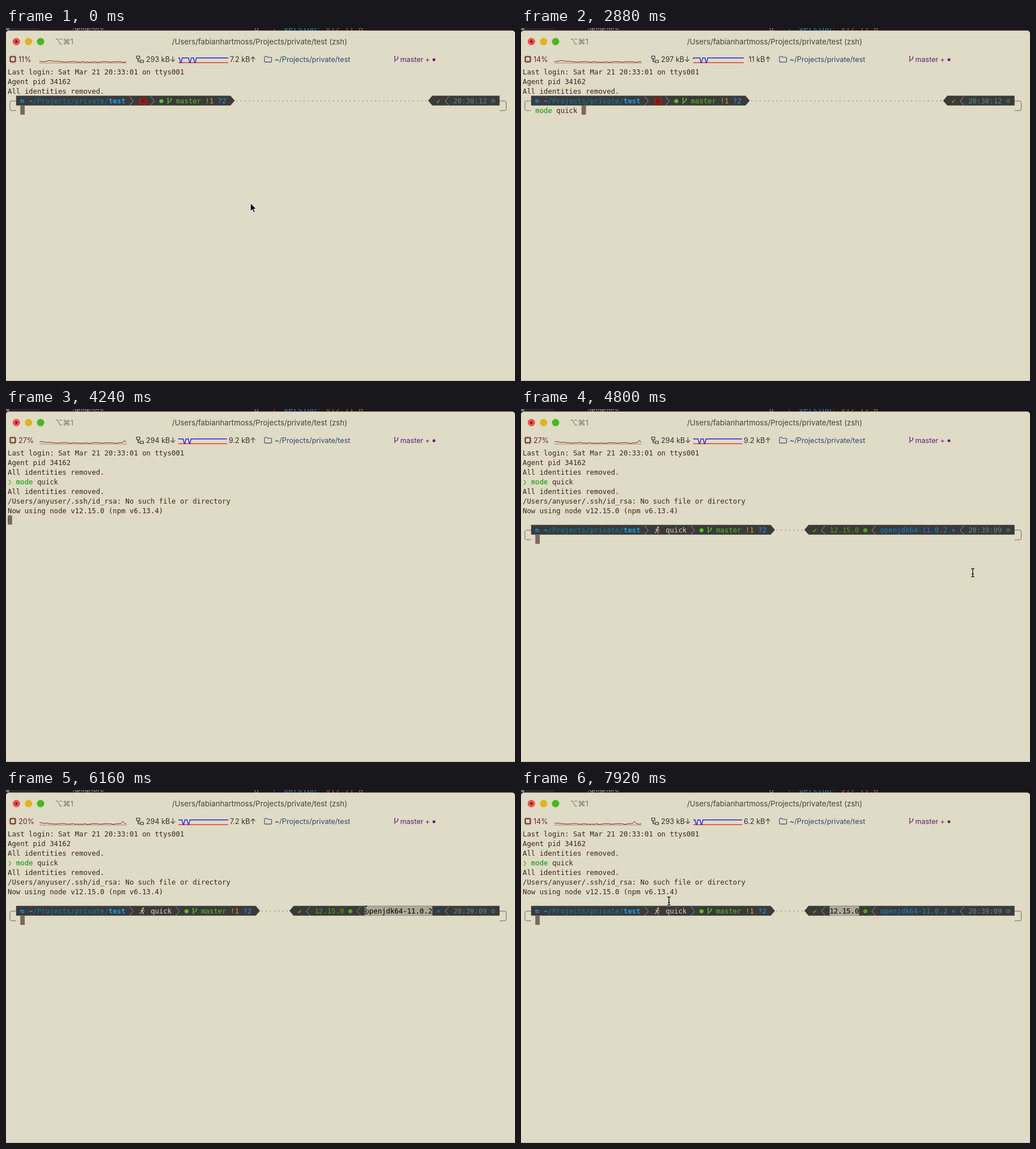
Animation, 898 px wide and 623 px high, one loop 8 s. Source, as an HTML page:

```html
<!DOCTYPE html>
<html lang="en">
<head>
<meta charset="utf-8">
<title>Terminal session</title>
<style>
  html, body { margin: 0; width: 100%; height: 100%; overflow: hidden; background: #dfdbc5; }
  svg { display: block; width: 898px; height: 623px; }
  text { white-space: pre; }
  .mono { font: 12.32px "DejaVu Sans Mono", "DejaVu Sans", monospace; fill: #3b2322; }
  .ui { font: 12.6px Inter, "DejaVu Sans", sans-serif; }
  .bold { font-weight: 700; }
</style>
</head>
<body>
<svg id="stage" viewBox="0 0 898 623"></svg>
<script>
const LOOP = 8000, STEP = 80;
const CW = 7.417, LEFT = 3, ROW = 17, TOP = 69;
const BAR = '#3a3a3a', DIR = '#0084b4', ANCHOR = '#12a4ee', GREEN = '#53c51d',
      OK = '#53a80c', GREY = '#989890', EDGE = '#6b695f', TIME = '#5f8787', BLUE = '#0f86d2', FG = '#3b2322';

const colX = c => LEFT + CW * c;
const rowY = r => TOP + ROW * r;
const el = id => document.getElementById(id);

// Drawing helpers on the character grid
const put = (col, row, str, fill = FG, cls = '') =>
  `<text class="mono ${cls}" x="${colX(col)}" y="${rowY(row) + 13.2}" style="fill:${fill}">${str}</text>`;
const line = (d, stroke, width = 1, extra = '') =>
  `<path d="${d}" fill="none" stroke="${stroke}" stroke-width="${width}" ${extra}/>`;
const rect = (x, y, w, h, fill, extra = '') =>
  `<rect x="${x}" y="${y}" width="${w}" height="${h}" fill="${fill}" ${extra}/>`;
const dot = (x, y, r, fill) => `<circle cx="${x}" cy="${y}" r="${r}" fill="${fill}"/>`;
const ui = (x, y, str, fill, extra = '') =>
  `<text class="ui" x="${x}" y="${y}" fill="${fill}" ${extra}>${str}</text>`;

function chevron(col, row, dir) {
  const x = colX(col) + (dir > 0 ? 0 : 7), y = rowY(row);
  return line(`M${x} ${y + 1}l${6.5 * dir} 7.8l${-6.5 * dir} 7.8`, GREY);
}

function branch(x, y, color, width) {
  return line(`M${x} ${y - 5}v10M${x} ${y + 2}q5.5 -1 5.5 -5`, color, width) +
    dot(x, y - 4.5, width * .9, color) + dot(x + 5.5, y - 3.5, width * .9, color);
}

function folderMark(row) {
  const x = colX(3), y = rowY(row) + 6;
  return `<path d="M${x} ${y}h3l1 1h3v2h-5l-2 3zM${x + 2} ${y + 4}h6l-2 2h-5z" fill="${BLUE}"/>`;
}

// Shared pieces of a two-line prompt
function promptBase(row, leftEnd, rightStart, clock) {
  const y = rowY(row) - 0.4, half = 8.6, mid = rowY(row) + 8.8, end = y + 2 * half;
  const x1 = colX(2), x2 = colX(leftEnd), x3 = colX(rightStart), x4 = colX(117);
  const d0 = colX(leftEnd + 1.5), d1 = colX(rightStart - 1.5);
  return `<path d="M${x1} ${y}H${x2}l7.4 ${half}l-7.4 ${half}H${x1}z" fill="${BAR}"/>` +
    `<path d="M${x4} ${y}H${x3}l-7.4 ${half}l7.4 ${half}H${x4}z" fill="${BAR}"/>` +
    line(`M${d0} ${mid}H${d1 + 1}`, EDGE, 1.6, `stroke-linecap="round" stroke-dasharray="0 ${CW}"`) +
    line(`M${x1} ${mid}H10q-3 0 -3 3V${mid + 14}q0 3 3 3H${x1}`, EDGE) +
    line(`M${x4} ${mid}H880q2.5 0 2.5 3V${mid + 14}q0 3 -2.5 3H${x4}`, EDGE) +
    folderMark(row) +
    put(5, row, '~', ANCHOR, 'bold') + put(6, row, '/Projects/private/', DIR) +
    put(24, row, 'test', ANCHOR, 'bold') + chevron(29, row, 1) +
    put(rightStart + 1, row, '✔', OK) + chevron(104, row, -1) +
    put(106, row, clock, TIME) +
    `<circle cx="859.3" cy="${mid}" r="3" fill="none" stroke="${TIME}"/>` +
    line(`M859.3 ${mid - 2}v2h1.6`, TIME, .8);
}

function gitPart(col, row) {
  const y = rowY(row) + 9;
  return chevron(col, row, 1) + dot(colX(col + 2) + 4, y, 3.6, GREEN) +
    branch(colX(col + 4) + 1, y, GREEN, 1.5) + put(col + 6, row, 'master', GREEN) +
    put(col + 13, row, '!1', '#cfa516') + put(col + 16, row, '?2', ANCHOR);
}

const crossBox = rect(235.5, 123.3, 12.5, 11.5, '#b3170f', 'rx="1.5"') +
  line('M238 125.5l7.5 7M245.5 125.5l-7.5 7', '#4a1512', 1.3) +
  line('M241.7 123.5v3M241.7 132v3', '#5a1a15', 1);

const runner = dot(241.8, 209, 1.8, '#dcb368') +
  line('M240.8 211.4l-1.4 3.6', '#c8c3b5', 2.4) +
  line('M239.6 215l2.8 1.4l-.6 3M239 215.5l-1.4 2.3h-2', '#d9b98a', 1.2) +
  line('M240 211.6l-2.8 1.2M241.6 212l3 1.4', '#dcb368', 1.1);

const firstPrompt = promptBase(3, 53, 101, '20:38:12') + crossBox + gitPart(34, 3);

const secondPrompt = promptBase(8, 59, 68, '20:39:09') + runner +
  put(34, 8, 'quick', '#d4d0c2') + gitPart(40, 8) +
  chevron(71, 8, -1) + put(73, 8, '12.15.0', OK) + dot(colX(81) + 3.7, 214, 3.6, OK) +
  chevron(83, 8, -1) + put(85, 8, 'openjdk64-11.0.2', BLUE) + dot(colX(102) + 3.5, 214, 2.6, '#126ba5');

const backdrop = rect(0, 0, 898, 14, '#1b181d') + rect(0, 0, 6, 4, '#77757a') + rect(7, 0, 52, 4, '#2a262b') +
  ui(117, 3.4, '.gitignore', '#b5b2b4') + ui(438, 4.5, '8', '#8b888d') + rect(473, 0, 1, 5, '#59565a') +
  `<text x="490" y="5.5" font-size="13.7" font-family="DejaVu Sans Mono, monospace" fill="#3d7fb5">version:` +
  `<tspan fill="#c4503f"> v12.11.0</tspan></text>`;

const titleBar = `<path d="M0 623V10q0 -5.5 6 -5.5H892q6 0 6 5.5V623z" fill="#dfdbc5"/>` +
  rect(0, 622, 898, 1, '#bdb9a6') +
  dot(18.3, 24, 6.5, '#f2504a') + dot(18.3, 24, 2.2, '#7c120f') +
  dot(39.8, 24, 6.5, '#e0b31f') + dot(61, 24, 6.5, '#46b920') +
  ui(86.5, 29, '⌥⌘1', '#79766a', 'style="font-size:13.4px"') +
  ui(447.5, 28.8, '/Users/fabianhartmoss/Projects/private/test (zsh)', '#45433c',
    'text-anchor="middle" style="font-size:13.2px"');

const CPU = '#6b2420', NET = '#33302a', PATH = '#2c4a75', GIT = '#5c2079';
const statusBar =
  line('M7.8 50.8h8.4v8.4h-8.4z', CPU, 1.6) +
  line('M9 48.5v2M12 48.5v2M15 48.5v2M9 60v2M12 60v2M15 60v2M5.5 52h2M5.5 55h2M5.5 58h2M16.5 52h2M16.5 55h2M16.5 58h2', CPU, 1) +
  line('M230.5 49.5h5.5v4.5h-5.5zM237 57h5.5v4h-5.5zM232 56.5h3M233 54v5.5h4', NET, 1.2) +
  `<text id="cpu" class="ui" x="22" y="60" fill="${CPU}"></text>` +
  `<text id="down" class="ui" x="247" y="60" fill="${NET}"></text>` +
  `<text id="up" class="ui" x="441" y="60" fill="${NET}" text-anchor="end"></text>` +
  line('M59 61.8H213', '#a8665a', .8) +
  `<path id="load" fill="none" stroke="#7d2a25" stroke-width="1"/>` +
  `<path id="send" fill="none" stroke="#e8382a" stroke-width="1.4"/>` +
  `<path id="recv" fill="none" stroke="#1d22ee" stroke-width="1.4"/>` +
  line('M456 51.2q0 -1.2 1.2 -1.2h3l1.6 1.7h5.6q1.2 0 1.2 1.2v6q0 1.2 -1.2 1.2h-10.2q-1.2 0 -1.2 -1.2z', PATH, 1.1) +
  ui(474, 60, '~/Projects/private/test', PATH) +
  branch(686, 55, GIT, 1.2) + ui(695.5, 60, 'master', GIT) + ui(739.5, 60, '+', GIT) + dot(755, 56, 2.5, GIT);

const intro = ['Last login: Sat Mar 21 20:33:01 on ttys001', 'Agent pid 34162', 'All identities removed.']
  .map((s, i) => put(0, i, s)).join('');
const output = [
  put(0, 4, 'All identities removed.'),
  put(0, 5, '/Users/anyuser/.ssh/id_rsa: No such file or directory'),
  put(0, 6, 'Now using node v12.15.0 (npm v6.13.4)')
];

const beam = 'M-2.8 -7.6q2.2 0 2.8 1.6q.6 -1.6 2.8 -1.6M0 -6V6M-2.8 7.6q2.2 0 2.8 -1.6q.6 1.6 2.8 1.6M-1.6 2.5h3.2';

el('stage').innerHTML = backdrop + titleBar + statusBar + intro +
  `<g id="first">${firstPrompt}<text id="word" class="mono" x="${colX(3)}" y="${rowY(4) + 13.2}"></text>` +
  `<text id="arg" class="mono" x="${colX(7)}" y="${rowY(4) + 13.2}"></text></g>` +
  `<g id="sent">${put(0, 3, '❯', GREEN, 'bold') + put(2, 3, 'mode', '#009600') + put(7, 3, 'quick')}</g>` +
  output.map((s, i) => `<g id="out${i}">${s}</g>`).join('') +
  `<g id="second">${secondPrompt}</g>` +
  `<rect id="mark" y="${rowY(8) - .4}" height="17.2" fill="#aba994"/>` +
  `<text id="marked" class="mono" y="${rowY(8) + 13.2}" style="fill:#000"></text>` +
  `<rect id="block" width="7.8" height="16.2" fill="#7b695f"/>` +
  `<path id="arrow" d="M431.3 309v14.3l3.3 -3l2.3 5.4l2.3 -1l-2.3 -5.2h4.4z" fill="#000" stroke="#fff" stroke-width=".9"/>` +
  `<g id="beam">${line(beam, '#f4f2e8', 3) + line(beam, '#111', 1.5)}</g>`;

// Start time, load, download, upload, right end of graph, place of the dip
const stats = [
  [0, '11%', 293, '7.2', 392, 324.5], [720, '18%', 293, '6.1', 392, 322.3],
  [2160, '14%', 297, '11', 393, 318], [3280, '34%', 302, '12', 392, 317],
  [4240, '27%', 294, '9.2', 390, 315], [5440, '20%', 294, '7.2', 392, 313],
  [7040, '14%', 293, '6.2', 390, 309.5]
];
const keys = [880, 1040, 1200, 1360, 1680, 1920, 2080, 2240, 2400, 2560, 2720];
const TYPED = 'mode quick ';
const ENTER = 3120, REPLY = [3280, 3360, 4240], READY = 4560;

const mouse = [
  [4480, 826, 430], [4800, 797, 289], [5120, 762, 227], [5360, 752, 214], [5520, 752, 214],
  [6080, 635, 212], [6240, 635, 212], [6560, 597, 213], [6640, 597, 213], [7040, 545, 213],
  [7360, 545, 213], [7840, 261, 196], [8000, 261, 196]
];
const drags = [
  { from: 5520, to: 6080, until: 6640, col: 85, str: 'openjdk64-11.0.2' },
  { from: 6640, to: 7040, until: LOOP, col: 73, str: '12.15.0' }
];

const show = (id, on) => el(id).setAttribute('visibility', on ? 'visible' : 'hidden');
const set = (id, attrs) => { for (const k in attrs) el(id).setAttribute(k, attrs[k]); };
const noise = n => { const v = Math.sin(n * 91.7 + 4) * 4375.5; return v - Math.floor(v); };

function mouseAt(t) {
  const i = Math.max(1, mouse.findIndex(k => k[0] >= t));
  const [t0, x0, y0] = mouse[i - 1], [t1, x1, y1] = mouse[i];
  const u = Math.max(0, (t - t0) / (t1 - t0)), e = u * u * (3 - 2 * u);
  return [x0 + (x1 - x0) * e, y0 + (y1 - y0) * e];
}

function loadPath(shift) {
  const pts = [];
  for (let x = 59; x <= 213; x += 3) {
    const n = Math.round((x + shift) / 3), w = n * 3;
    const bump = w < 95 ? 1.6 * noise(n + 7) + .6 : 0;
    const peak = Math.max(0, 4.5 - Math.abs(w - 225));
    pts.push(`${x} ${(60.6 - noise(n) * 1.5 - bump - peak).toFixed(1)}`);
  }
  return 'M' + pts.join('L');
}

function recvPath(dip, end) {
  const x0 = 304, hi = 52.8, lo = 61;
  const near = x => Math.min(...[-16, 0, 9].map(o => Math.abs(x - dip - o)));
  let d = '';
  for (let x = x0; x <= end; x += .5) {
    const level = Math.min(1, Math.max(0, (near(x) - .5) / 2));
    d += `${d ? 'L' : 'M'}${x} ${(lo - (lo - hi) * level).toFixed(1)}`;
  }
  return d;
}

let lastStat = -1;
function drawStats(t) {
  const i = stats.filter(s => s[0] <= t).length - 1;
  if (i === lastStat) return;
  lastStat = i;
  const [, cpu, down, up, end, dip] = stats[i];
  el('cpu').textContent = cpu;
  el('down').textContent = `${down} kB↓`;
  el('up').textContent = `${up} kB↑`;
  set('load', { d: loadPath(i * 4) });
  set('send', { d: `M304 61.3H${end}` });
  set('recv', { d: recvPath(dip, end) });
}

function drawSelection(t, x) {
  const drag = drags.find(d => t >= d.from && t < d.until);
  show('mark', drag);
  show('marked', drag);
  if (!drag) return;
  const edge = t >= drag.to ? drag.col : Math.round((x - LEFT) / CW);
  const skip = Math.min(drag.str.length, Math.max(0, edge - drag.col));
  const left = colX(drag.col + skip);
  set('mark', { x: left, width: CW * (drag.str.length - skip) });
  set('marked', { x: left });
  el('marked').textContent = drag.str.slice(skip);
}

function draw(time) {
  const t = Math.floor((time % LOOP) / STEP) * STEP;
  drawStats(t);

  const count = keys.filter(k => k <= t).length;
  const text = TYPED.slice(0, count);
  el('word').textContent = text.slice(0, 4);
  el('word').style.fill = count < 4 ? '#cc0000' : '#009600';
  el('arg').textContent = text.slice(4);

  show('first', t < ENTER);
  show('sent', t >= ENTER);
  REPLY.forEach((at, i) => show('out' + i, t >= at));
  show('second', t >= READY);

  const lines = REPLY.filter(at => t >= at).length;
  const [col, row] = t < ENTER ? [3 + count, 4] : t < READY ? [0, 4 + lines] : [3, 9];
  set('block', { x: colX(col), y: rowY(row) - .2 });

  const [x, y] = mouseAt(t);
  show('arrow', t < keys[0]);
  show('beam', t >= mouse[0][0]);
  set('beam', { transform: `translate(${x} ${y})` });
  drawSelection(t, x);
}

const start = performance.now();
function tick() {
  draw(performance.now() - start);
  requestAnimationFrame(tick);
}
tick();
</script>
</body>
</html>
```
